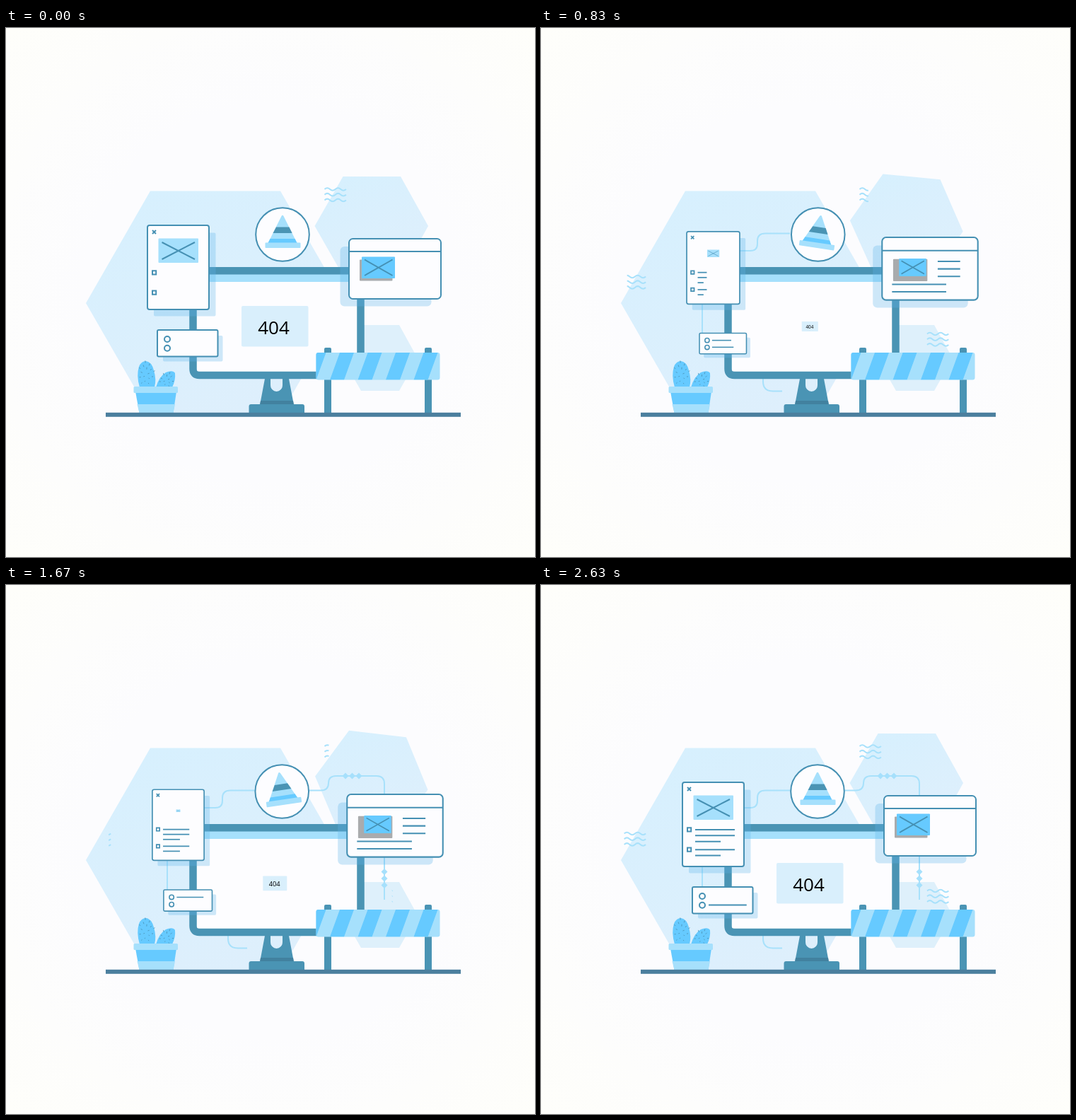
Animation of 748x748 px, one loop 2.66 s. Source, as an HTML page:

```html
<!DOCTYPE html>
<html lang="en">
<head>
<meta charset="utf-8">
<title>404</title>
<style>
  html, body { margin: 0; width: 100%; height: 100%; overflow: hidden; }
  body { background: radial-gradient(circle at 50% 50%, #fcfcfe 50%, #fefefa 100%); }
  svg { display: block; width: 100vw; height: 100vh; }
  .dark { fill: #4a94b4; }
  .mid { fill: #66caff; }
  .light { fill: #a6e0fc; }
  .pale { fill: #d9effc; }
  .shade { fill: #5fb4e6; fill-opacity: .3; }
  .panel { fill: #fdfdff; stroke: #4590b3; stroke-width: 2; }
  .ink { fill: none; stroke: #4590b3; stroke-width: 2; }
  .wire { fill: none; stroke: #a8e1fb; stroke-width: 2; }
  .spike { fill: none; stroke: #4a8fb0; stroke-width: .8; }
  text { font-family: "Open Sans", "Noto Sans", sans-serif; font-size: 26px; text-anchor: middle; }
</style>
</head>
<body>
<svg viewBox="0 0 748 748">
  <defs>
    <linearGradient id="sky" x1="0" y1="0" x2=".6" y2="1">
      <stop offset="0" stop-color="#d6f0fe"/>
      <stop offset="1" stop-color="#deeffc"/>
    </linearGradient>
    <path id="ripple" pathLength="1" d="M0 0q3.800 -3.600 7.600 0t7.600 0t7.600 0t7.600 0"/>
    <g id="waves"><use href="#ripple"/><use href="#ripple" y="7.700"/><use href="#ripple" y="15.400"/></g>
    <path id="gem" d="M-4.500 0L0 -4.500L4.500 0L0 4.500Z"/>
    <g id="gemRow" class="light"><use href="#gem" x="-9.500"/><use href="#gem"/><use href="#gem" x="9.500"/></g>
    <clipPath id="board"><rect x="438.500" y="459" width="175" height="38.500" rx="3"/></clipPath>
  </defs>

  <!-- backdrop -->
  <path fill="url(#sky)" d="M204 230.500H388L479 389L388 547H204L113 389Z"/>
  <path id="hex" fill="url(#sky)" d="M476.500 210H558L597 280L558 350H476.500L436.500 280Z"/>
  <path fill="#def0fb" d="M502 420H556L582 467L556 513H502L476 467Z"/>
  <g class="wire">
    <use id="waveTop" href="#waves" x="450.500" y="228"/>
    <use id="waveLeft" href="#waves" x="117.700" y="351.500"/>
    <use id="waveLow" href="#waves" x="546" y="432.500"/>
  </g>

  <!-- connectors -->
  <g class="wire">
    <path id="wire0" pathLength="1" d="M341 513.500H328Q314 513.500 314 500V492"/>
    <path id="wire1" pathLength="1" d="M228 440V385"/>
    <path id="wire2" pathLength="1" d="M270 315H296Q306 315 306 305V301Q306 290.500 317 290.500H356"/>
    <path id="wire3" pathLength="1" d="M426 290.500H445Q456 290.500 456 280Q456 270 467 270H524Q535 270 535 281V300"/>
    <path id="wire4" pathLength="1" d="M535 380V445"/>
  </g>
  <use id="gems0" href="#gemRow" transform="translate(489.500 270)"/>
  <use id="gems1" href="#gemRow" transform="translate(535 415) rotate(90)"/>

  <!-- monitor -->
  <path fill="#fdfdff" d="M264 343H502V491H264Z"/>
  <path class="light" d="M270 348H496V359H270Z"/>
  <path fill="none" stroke="#4a94b4" stroke-width="10.500" d="M501.500 470V343.300H264.500V482Q264.500 491 273.500 491H496Q501.500 491 501.500 485V465"/>
  <path class="dark" d="M366 496H374V505a8.500 9 0 0 0 17 0V496H400L407 533H359Z"/>
  <path fill="#42819f" d="M360 527H406L407 533H359Z"/>
  <path class="dark" d="M343.500 544V535Q343.500 532 346.500 532H419Q422 532 422 535V544Z"/>

  <g id="card">
    <rect class="pale" x="333" y="393" width="94.500" height="57.500" rx="2"/>
    <text x="378.500" y="433">404</text>
  </g>

  <!-- warning sign -->
  <g id="sign">
    <circle class="panel" cx="391" cy="292" r="37.800"/>
    <g id="cone">
      <path class="light" d="M389.500 266Q391 263.500 392.500 266L412 305H370Z"/>
      <path class="dark" d="M382 281.500H400.400L404.600 290H377.600Z"/>
      <path class="mid" d="M373.500 298H408.500L412 305H370Z"/>
      <rect class="light" x="366.500" y="303.500" width="50" height="7.500" rx="1"/>
    </g>
  </g>

  <!-- document -->
  <g id="doc">
    <rect class="shade" x="209" y="289.500" width="87.500" height="118" rx="2"/>
    <rect class="panel" x="200" y="279" width="87" height="119" rx="3"/>
    <path class="ink" d="M207 286l5 5m0 -5l-5 5M207 343.300h5.200v5.200h-5.200zM207 371.600h5.200v5.200h-5.200z"/>
    <g id="docPic">
      <rect class="light" x="215.500" y="297.500" width="56.500" height="34.500" rx="1"/>
      <path class="ink" d="M220.500 303L267 327M267 303L220.500 327"/>
    </g>
    <g id="docText" class="ink">
      <path pathLength="1" d="M218 346H274"/>
      <path pathLength="1" d="M218 354.300H274"/>
      <path pathLength="1" d="M218 362.800H254"/>
      <path pathLength="1" d="M218 374.200H274"/>
      <path pathLength="1" d="M218 382.600H254"/>
    </g>
  </g>

  <!-- server box -->
  <g id="box">
    <rect class="shade" x="222" y="435" width="84.500" height="36.500" rx="2"/>
    <rect class="panel" x="214" y="427" width="85.500" height="37.500" rx="2"/>
    <circle class="ink" cx="228" cy="440" r="4"/>
    <circle class="ink" cx="228" cy="452.700" r="4"/>
    <path id="boxTop" class="ink" pathLength="1" d="M237 440H291"/>
    <path id="boxLow" class="ink" pathLength="1" d="M237 452.500H291"/>
  </g>

  <!-- browser window -->
  <g id="win">
    <rect class="shade" x="472.500" y="309" width="129" height="84.500" rx="6"/>
    <rect class="panel" x="485" y="298" width="130" height="85" rx="5.500"/>
    <path class="ink" d="M485 316H615"/>
    <rect fill="#a9abad" x="500" y="327.500" width="46.500" height="30" rx="1"/>
    <g id="winPic">
      <rect class="mid" x="503" y="323.500" width="47" height="30.500" rx="1"/>
      <path class="ink" d="M507 327.500L546.500 350M546.500 327.500L507 350"/>
    </g>
    <g id="winText" class="ink">
      <path pathLength="1" d="M560.500 330.500H600.500"/>
      <path pathLength="1" d="M560.500 340.800H600.500"/>
      <path pathLength="1" d="M560.500 351H600.500"/>
      <path pathLength="1" d="M498.500 361.800H595"/>
      <path pathLength="1" d="M498.500 371.800H595"/>
    </g>
  </g>

  <!-- barrier -->
  <path class="dark" d="M450 544V454Q450 452 452 452H458Q460 452 460 454V544ZM592 544V454Q592 452 594 452H600Q602 452 602 454V544Z"/>
  <g clip-path="url(#board)">
    <rect class="light" x="438" y="458" width="176" height="40"/>
    <path id="stripes" class="mid"/>
  </g>

  <!-- cactus -->
  <path class="mid" d="M189 508Q184 491 188 479Q191 471 198 471Q206 472 209 484Q213 497 210 508Z"/>
  <path class="mid" d="M212 508Q217 492 226 487Q236 483 239 488Q240 498 235 508Z"/>
  <path id="spikes" class="spike"/>
  <path class="mid" d="M183 514H241L236.500 544H188.500Z"/>
  <path class="light" d="M185.500 532H239L236.500 544H188.500Z"/>
  <rect class="light" x="180.500" y="507" width="62.500" height="9" rx="1.500"/>

  <rect fill="#4b7f9e" x="141" y="543.800" width="502" height="6"/>
</svg>
<script>
const LOOP = 2660;
const $ = id => document.getElementById(id);
const range = n => [...Array(n).keys()];
const ease = x => (1 - Math.cos(Math.PI * Math.min(1, Math.max(0, x)))) / 2;

// Eases from 0 to 1, back to 0 and so on, turning at the given times
const swing = (t, ...turns) => turns.slice(1).reduce(
  (v, end, i) => v + (i % 2 ? -1 : 1) * ease((t - turns[i]) / (end - turns[i])), 0);

function scale(id, x, y, s) {
  $(id).setAttribute("transform", `translate(${x} ${y}) scale(${s}) translate(${-x} ${-y})`);
}

// Reveals part p of the strokes, from their start or from their end
function reveal(id, p, fromEnd) {
  const { style } = $(id);
  style.visibility = p > .002 ? "visible" : "hidden";
  style.strokeDasharray = `${p} 2`;
  style.strokeDashoffset = fromEnd ? p - 1 : 0;
}

// Short spikes spread in a spiral over an ellipse
const spikes = (n, x, y, rx, ry) => range(n).map(i => {
  const a = i * 2.4, r = Math.sqrt((i + .5) / n);
  const dx = Math.cos(a), dy = Math.sin(a);
  return `M${x + rx * r * dx} ${y + ry * r * dy}l${2.2 * dx} ${2.2 * dy - .8}`;
}).join("");

$("spikes").setAttribute("d", spikes(16, 198.5, 489, 11, 16) + spikes(12, 227, 497, 10, 9));
$("stripes").setAttribute("d",
  range(5).map(i => `M${432.5 + i * 39.5} 459h20l-14 38.500h-20z`).join(""));

function render(t) {
  const shrink = swing(t, 0, 1400, 2580);
  const grow = swing(t, 0, 1230, 2620);
  const tilt = 8.5 * (swing(t, 0, 800, 1700) - swing(t, 800, 1700, 2640));

  $("hex").setAttribute("transform", `rotate(${8 * swing(t, 0, 1330, 2640)} 517 280)`);
  $("sign").setAttribute("transform", `translate(${tilt * .09} 0)`);
  $("cone").setAttribute("transform", `rotate(${tilt} 391 292)`);

  scale("doc", 243.5, 343.6, 1 - .193 * swing(t, 0, 1290, 2660));
  scale("docPic", 243.5, 314.7, 1 - shrink);
  reveal("docText", swing(t, 0, 2400));

  scale("box", 259, 447.4, 1 - .295 * swing(t, 0, 630, 1240, 1945, 2540));
  reveal("boxTop", shrink);
  reveal("boxLow", swing(t, 0, 850, 1640, 2640) * (.6 + .4 * t / LOOP));

  scale("win", 550, 344, 1 + .055 * grow);
  scale("winPic", 526.5, 338.8, 1 - .28 * grow);
  reveal("winText", grow);

  scale("card", 380.3, 422, 1 - .992 * swing(t, 0, 620, 1270, 1945, 2590));

  reveal("waveTop", 1 - .92 * shrink);
  reveal("waveLeft", swing(t, 0, 640, 1450, 2540), true);
  reveal("waveLow", swing(t, 0, 800, 1580, 2600));

  [20, 280, 630, 840, 1080].forEach((at, i) => reveal("wire" + i, swing(t, at, at + 230)));
  [1010, 1270].forEach((at, i) => { $("gems" + i).style.opacity = swing(t, at, at + 140); });
}

function tick() {
  render(performance.now() % LOOP);
  requestAnimationFrame(tick);
}
tick();
</script>
</body>
</html>
```
